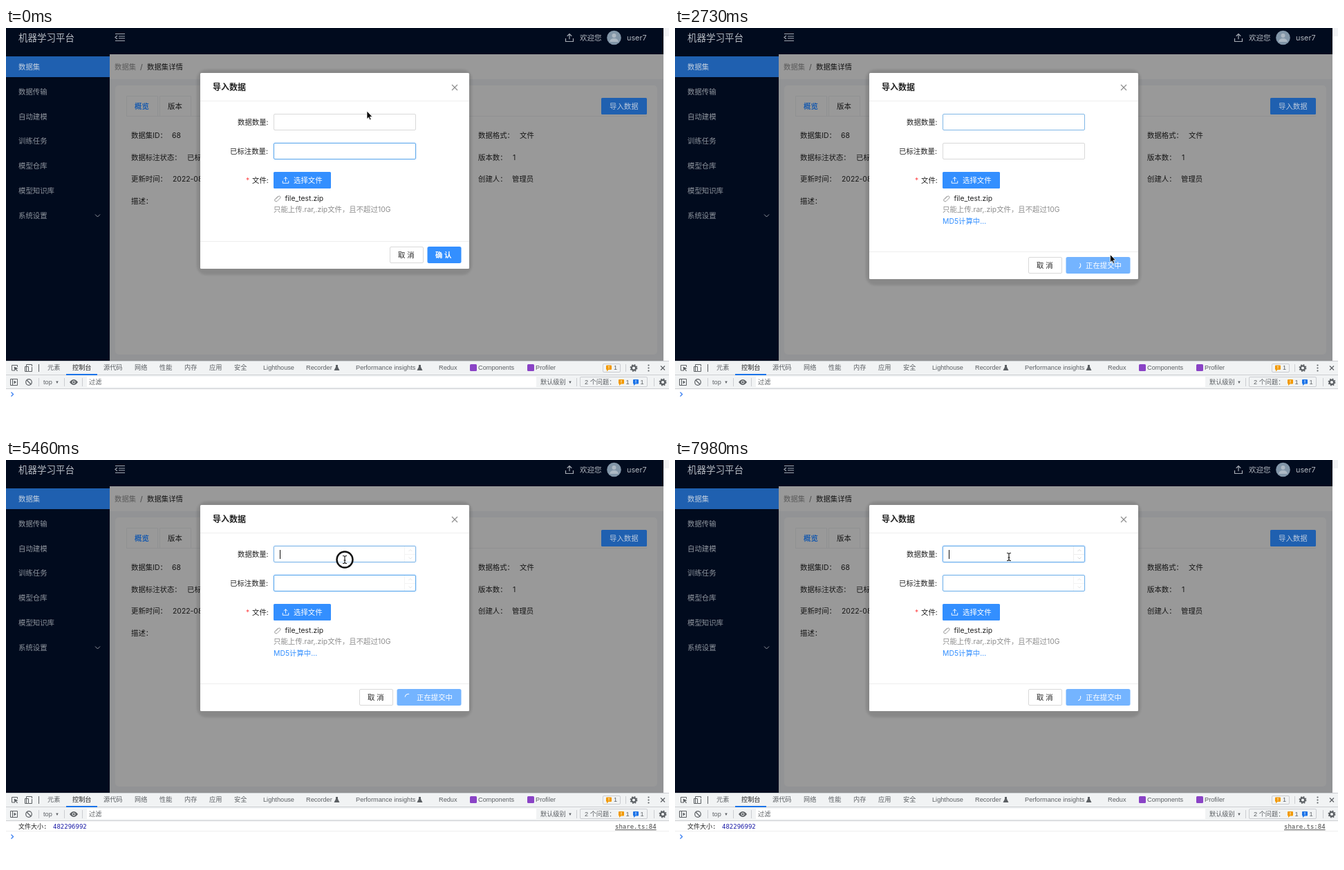
Animation of 959x584 px, one loop 8000 ms. Source, as an HTML page:

```html
<!DOCTYPE html>
<html lang="zh">
<head>
<meta charset="utf-8">
<style>
html, body { margin: 0; width: 100%; height: 100%; overflow: hidden; background: #fff; }
svg { display: block; width: 959px; height: 584px; }
text { font-family: Inter, 'Noto Sans CJK SC', 'Noto Sans CJK', sans-serif; white-space: pre; }
.tool { font-family: 'Liberation Sans', 'Noto Sans CJK SC', 'Noto Sans CJK', sans-serif; }
.mono { font-family: 'DejaVu Sans Mono', 'Noto Sans CJK SC', 'Noto Sans CJK', monospace; }
.bold { font-weight: 600; }
</style>
</head>
<body>
<svg id="stage" viewBox="0 0 959 584"></svg>
<script>
const LOOP = 8000, SUBMIT = 2660, LOGGED = 3850;
const BLUE = '#338fff', FOCUS = '#3d9be9', INK = '#222', TOOL = '#5b5f63', LINE = '#cbcdd1';

// y is the visual middle of the line
const text = (x, y, str, size, fill, cls = '', extra = '') =>
  `<text x="${x}" y="${y + size * .36}" font-size="${size}" fill="${fill}" class="${cls}" ${extra}>${str}</text>`;
const rect = (x, y, w, h, fill, extra = '') =>
  `<rect x="${x}" y="${y}" width="${w}" height="${h}" fill="${fill}" ${extra}/>`;
const path = (d, stroke, width = 1, extra = '') =>
  `<path d="${d}" fill="none" stroke="${stroke}" stroke-width="${width}" ${extra}/>`;
const group = (id, body) => `<g id="${id}">${body}</g>`;
const tool = (x, y, str, fill = TOOL, size = 9.2) => text(x, y, str, size, fill, 'tool');
const upload = (x, y, s, color) =>
  path(`M-5 1V5H5V1M0 2V-5M-3-2L0-5 3-2`, color, 1.1, `transform="translate(${x} ${y}) scale(${s})"`);
const gear = (x, y) => `<circle cx="${x}" cy="${y}" r="3.2" fill="none" stroke="${TOOL}" stroke-width="2.2"/>` +
  `<circle cx="${x}" cy="${y}" r="4.7" fill="none" stroke="${TOOL}" stroke-width="1.5" stroke-dasharray="1.9 1.8"/>`;
const flask = (x, y) => `<path d="M${x - 1.5} ${y - 4}h3v3l2.5 5h-8l2.5-5z" fill="${TOOL}"/>`;
const issue = (x, y, color) =>
  rect(x, y, 8, 6.5, color, 'rx="1"') + `<path d="M${x + 1} ${y + 6}v3l3-3z" fill="${color}"/>` +
  path(`M${x + 4} ${y + 1.2}v2.4M${x + 4} ${y + 4.4}v1`, '#fff');
const button = (x, y, w, fill, border) =>
  rect(x + .5, y + .5, w - 1, 23, fill, `rx="1.5" stroke="${border}"`);

function page() {
  const menu = ['数据集', '数据传输', '自动建模', '训练任务', '模型仓库', '模型知识库', '系统设置'];
  const facts = [
    [181, 155, '数据集ID：'], [240, 155, '68'], [181, 187, '数据标注状态：'], [262, 187, '已标注'],
    [181, 218, '更新时间：'], [241, 218, '2022-08-'], [181, 250, '描述：'],
    [683, 155, '数据格式：'], [743, 155, '文件'], [683, 187, '版本数：'], [733, 187, '1'],
    [683, 218, '创建人：'], [732, 218, '管理员']];
  return rect(0, 0, 959, 584, '#fff') + rect(951, 0, 8, 12, '#f2f3f5') +
    rect(0, 0, 951, 481, '#010b1e') + rect(150, 38, 801, 443, '#929395') + rect(150, 38, 801, 36, '#999') +
    rect(158, 83, 784, 389, '#999', 'rx="5"') +
    text(18, 14, '机器学习平台', 13.5, '#b4b9c1') +
    path('M158 8.5H172M163 12H172M163 15H172M158 18.5H172M161 11L158 13.5 161 16', '#a2a7b0', 1.2) +
    upload(815, 14, 1.1, '#a6abb4') + text(830, 14, '欢迎您', 10.5, '#b4b9c1') +
    '<circle cx="879.500" cy="14" r="10.300" fill="#8296a8"/><circle cx="879.500" cy="11" r="3" fill="#adb9c4"/>' +
    '<path d="M873 20q1-5 6.500-5t6.500 5z" fill="#adb9c4"/>' + text(898, 14, 'user7', 10.8, '#b4b9c1') +
    rect(0, 41, 150, 30, '#1f60b0') +
    menu.map((m, i) => text(18, 56 + i * 35.9, m, 10.4, i ? '#8f959e' : '#c2cfdf')).join('') +
    path('M129 269.500l3.500 3.500 3.500-3.500', '#8f959e') +
    text(157, 56, '数据集', 10.4, '#5b5b5b') + text(194, 56, '/', 10.4, '#444') +
    text(204, 56, '数据集详情', 10.4, '#161616') +
    path('M174.500 127V98.500H219.500V127M222.500 127V98.500H267.500V127M174 127.500H927', '#909192') +
    text(186, 113, '概览', 10.4, '#1c5cad', 'bold') + text(234, 113, '版本', 10.4, '#161616') +
    rect(861, 101, 66, 24, '#1f60b0', 'rx="1.500"') + text(873, 113, '导入数据', 10.4, '#b9c8dc') +
    facts.map(([x, y, s]) => text(x, y, s, 10.4, '#161616')).join('');
}

function devtools() {
  const tabs = [[60, '元素'], [141, '源代码'], [186, '网络'], [222, '性能'], [258, '内存'], [294, '应用'], [330, '安全'],
    [372, 'Lighthouse'], [434, 'Recorder'], [506, 'Performance insights'], [626, 'Redux'],
    [683, 'Components'], [766, 'Profiler']];
  return rect(0, 481, 959, 41, '#f1f3f4') + path('M0 481.500H959M0 501.500H959M0 521.500H959', LINE) +
    path('M13 495H8.500V487.500H16.500V490M29.500 496V486.500H37.500V489M27.500 489.500H32.500V496.500H27.500ZM33 496.500H37.500V490M47.500 486V497', TOOL) +
    `<path d="M11.500 489.500l6 2.500-2.500 1 2 2.500-1 .7-2-2.600-1.500 2z" fill="${TOOL}"/>` +
    tabs.map(([x, s]) => tool(x, 491, s)).join('') + tool(96, 491, '控制台', '#222') +
    rect(87, 500, 45, 2, '#1a73e8') + flask(478.5, 491) + flask(598.5, 491) +
    rect(671, 486, 10, 10, '#8a43c6', 'rx="1.500"') + rect(754, 486, 10, 10, '#8a43c6', 'rx="1.500"') +
    rect(863.5, 485.5, 25, 12, 'none', `rx="1.5" stroke="${LINE}"`) + issue(868, 487.5, '#f29900') + tool(879, 491, '1') +
    path('M896.500 486V497', LINE) + gear(908, 491.5) +
    [487.5, 491.5, 495.5].map(y => `<circle cx="929.5" cy="${y}" r="1.1" fill="${TOOL}"/>`).join('') +
    path('M947 488.500l6 6m0-6l-6 6', TOOL, 1.2) +
    path('M6.500 507.500H16.500V516.500H6.500ZM9.500 507V517', TOOL) + `<path d="M11.500 509.500l3.500 2.500-3.500 2.500z" fill="${TOOL}"/>` +
    `<circle cx="33" cy="512" r="4.300" fill="none" stroke="${TOOL}" stroke-width="1.200"/>` + path('M30 509l6 6', TOOL, 1.2) +
    path('M47.500 506V518M84.500 506V518M110.500 506V518M825.500 506V518M937.500 506V518', LINE) +
    tool(54, 511.5, 'top') + tool(71, 511.5, '▼', TOOL, 6) +
    `<path d="M92 512q6-8 12 0q-6 8-12 0z" fill="${TOOL}"/><circle cx="98" cy="512" r="2" fill="${TOOL}" stroke="#f1f3f4"/>` +
    rect(117, 504, 650, 15, '#fff') + tool(120, 512, '过滤') +
    tool(773, 512, '默认级别') + tool(813, 512, '▼', TOOL, 6) +
    rect(830.5, 504.5, 97, 14, 'none', `rx="1.5" stroke="${LINE}"`) + tool(837, 512, '2 个问题：') +
    issue(886, 508, '#f29900') + tool(896.5, 512, '1') + issue(907, 508, '#1a73e8') + tool(917.5, 512, '1') + gear(950, 512) +
    group('log', text(18, 530, '文件大小:', 9, INK, 'mono') + text(68, 530, '482296992', 9, '#1a1aa6', 'mono') +
      text(881, 530, 'share.ts:84', 9, '#444', 'mono', 'text-decoration="underline"') + path('M0 536.500H959', '#eee')) +
    group('prompt', path('M7.500 526.500l3 3-3 3', '#367cf1', 1.3));
}

const field = (n, y) =>
  rect(387.5, y + .5, 205, 23, '#fff', `id="box${n}" rx="1.5"`) +
  group('arrows' + n, path(`M576.5 ${y + 1}V${y + 23}M577 ${y + 12.5}H592`, '#d9d9d9') +
    path(`M582.5 ${y + 8}l2.500-2.500 2.500 2.500M582.5 ${y + 16.500}l2.500 2.500 2.500-2.500`, '#a0a0a0', .9)) +
  rect(396, y + 6, 1, 13, '#111', `id="caret${n}"`);

function modal() {
  return rect(276, 60, 398, 297, '#000', 'id="shadow" rx="14" opacity=".1" filter="url(#soft)"') +
    rect(281, 65, 389, 283, '#fff', 'id="sheet" rx="1.500"') + path('M281 105.500H670', '#eee') +
    text(299, 85.5, '导入数据', 12, INK, 'bold') + path('M645 82l8 8m0-8l-8 8', '#8c8c8c', 1.1) +
    text(335, 136, '数据数量:', 10.4, INK) + text(324, 178, '已标注数量:', 10.4, INK) +
    text(347, 220, '*', 10.4, '#ff4d4f') + text(356, 220, '文件:', 10.4, INK) +
    field(1, 124) + field(2, 166) +
    rect(387, 208, 83, 24, BLUE, 'rx="1.500"') + upload(404.5, 220, .85, '#fff') + text(416, 220, '选择文件', 10.4, '#fff') +
    path('M390 247.500l4-4q1.500-1.200 2.500 0t0 2.500l-4.500 4.500q-1.500 1-2.700-.2t-.2-2.800l4.500-4.500', '#8c8c8c', .9) +
    text(403.5, 246, 'file_test.zip', 10.4, INK) + text(387, 262.5, '只能上传.rar,.zip文件，且不超过10G', 10.4, '#8c8c8c') +
    group('hashing', text(387, 279, 'MD5计算中...', 10.4, BLUE)) +
    group('ready', path('M281 308.500H670', '#eee') + button(555, 316, 49, '#fff', '#d9d9d9') +
      text(567, 328, '取 消', 10.4, INK) + button(609.5, 316, 49, BLUE, BLUE) + text(621, 328, '确 认', 10.4, '#fff', 'bold')) +
    group('busy', path('M281 323.500H670', '#eee') + button(511, 331, 49, '#fff', '#d9d9d9') +
      text(523, 343, '取 消', 10.4, INK) + button(565.5, 331, 93, '#74b4ff', '#74b4ff') + text(594, 343, '正在提交中', 10.4, '#fff') +
      path('M0-4.800A4.800 4.800 0 0 1 4.800 0', '#fff', 1, 'id="spinner" stroke-linecap="round"'));
}

document.getElementById('stage').innerHTML =
  '<filter id="soft"><feGaussianBlur stdDeviation="1.500"/></filter>' + page() + modal() + devtools() +
  group('pointer',
    group('ring', '<circle r="11.500" fill="#fff" fill-opacity=".6" stroke="#111" stroke-width="2.400"/>') +
    group('arrow', '<path d="M0 0V11.500L2.600 9.200 4.300 13 6.200 12.200 4.500 8.400H8Z" fill="#000" stroke="#fff" stroke-width=".8"/>') +
    group('beam', path('M-3-5.500Q0-5.500 0-4Q0-5.500 3-5.500M0-4V4M-3 5.500Q0 5.500 0 4Q0 5.500 3 5.500M-1.500 1H1.500', '#fff', 2.4) +
      path('M-3-5.500Q0-5.500 0-4Q0-5.500 3-5.500M0-4V4M-3 5.500Q0 5.500 0 4Q0 5.500 3 5.500M-1.500 1H1.500', '#111', 1.1)));
const el = Object.fromEntries([...document.querySelectorAll('[id]')].map(e => [e.id, e]));

// [time, x, y, field that a click focuses (0 = none); left out when only passing]
const moves = [
  [0, 522, 120], [560, 515, 140, 1], [890, 511, 172, 2], [1050, 510, 150], [1130, 509, 140], [1560, 508, 139, 1],
  [1820, 509, 140], [2030, 601, 271], [2250, 628, 325], [2600, 630, 328, 0], [3350, 498, 174, 2], [3725, 496, 141, 1],
  [4180, 494, 174, 2], [4600, 492, 142, 1], [5000, 491, 174, 2], [5410, 490, 144, 1], [5780, 488, 174, 2],
  [6150, 488, 143, 1], [6560, 487, 174, 2], [6960, 486, 144, 1], [7560, 484, 173, 2], [7890, 483, 140, 1]];
const clicks = moves.filter(m => m.length > 3).map(([time, , , focus]) => ({ time, focus }));
// the pointer rests around each click
const track = moves.flatMap(([t, x, y, focus]) =>
  focus === undefined ? [[t, x, y]] : [[t - 70, x, y], [t + 110, x, y]]);

function pointerAt(t) {
  const i = track.findIndex(p => p[0] > t);
  if (i < 1) return track[i < 0 ? track.length - 1 : 0].slice(1);
  const [a, b] = [track[i - 1], track[i]], u = (t - a[0]) / (b[0] - a[0]), s = u * u * (3 - 2 * u);
  return [a[1] + (b[1] - a[1]) * s, a[2] + (b[2] - a[2]) * s];
}
const lastClick = t => clicks.findLast(c => c.time <= t) || { time: -60, focus: t < -60 ? 2 : 0 };
function hoverAt(t) {
  const [x, y] = pointerAt(t);
  if (x < 387 || x > 593) return 0;
  return y >= 124 && y <= 148 ? 1 : y >= 166 && y <= 190 ? 2 : 0;
}
// linear transition: the share of the recent past in which the test held
function fade(test, t, span, delay = 0) {
  let sum = 0;
  for (let i = 0; i < 24; i++) sum += test(t - delay - span * (i + .5) / 24);
  return sum / 24;
}
const show = (e, on) => { e.style.display = on ? '' : 'none'; };
const mix = (a, b, u) => `rgb(${a.map((v, i) => Math.round(v + (b[i] - v) * u))})`;

function draw(t) {
  const busy = t >= SUBMIT, logged = t >= LOGGED, click = lastClick(t);
  for (const n of [1, 2]) {
    const focused = s => lastClick(s).focus === n, hovered = s => hoverAt(s) === n;
    const blue = fade(s => focused(s) || hovered(s), t, 300), glow = fade(focused, t, 110);
    const box = el['box' + n];
    box.setAttribute('stroke', mix([217, 217, 217], [64, 158, 240], blue));
    box.style.filter = glow ? `drop-shadow(0 0 1.2px rgba(51,143,255,${glow * .75}))` : '';
    el['arrows' + n].style.opacity = fade(hovered, t, 240, 100);
    show(el['caret' + n], click.focus === n && (t - click.time) % 1000 < 500);
  }
  show(el.hashing, busy);
  show(el.busy, busy);
  show(el.ready, !busy);
  el.sheet.setAttribute('height', busy ? 298 : 283);
  el.shadow.setAttribute('height', busy ? 312 : 297);
  el.spinner.setAttribute('transform', `translate(582 343) rotate(${(t - 3570) * .346 - 15})`);
  show(el.log, logged);
  el.prompt.setAttribute('transform', `translate(0 ${logged ? 15 : 0})`);

  const [x, y] = pointerAt(t), beam = hoverAt(t) > 0;
  el.pointer.setAttribute('transform', `translate(${x} ${y})`);
  show(el.beam, beam);
  show(el.arrow, !beam);
  show(el.ring, clicks.some(c => t > c.time - 25 && t < c.time + 75));
}

const start = performance.now();
function tick() {
  draw((performance.now() - start) % LOOP);
  requestAnimationFrame(tick);
}
tick();
</script>
</body>
</html>
```
